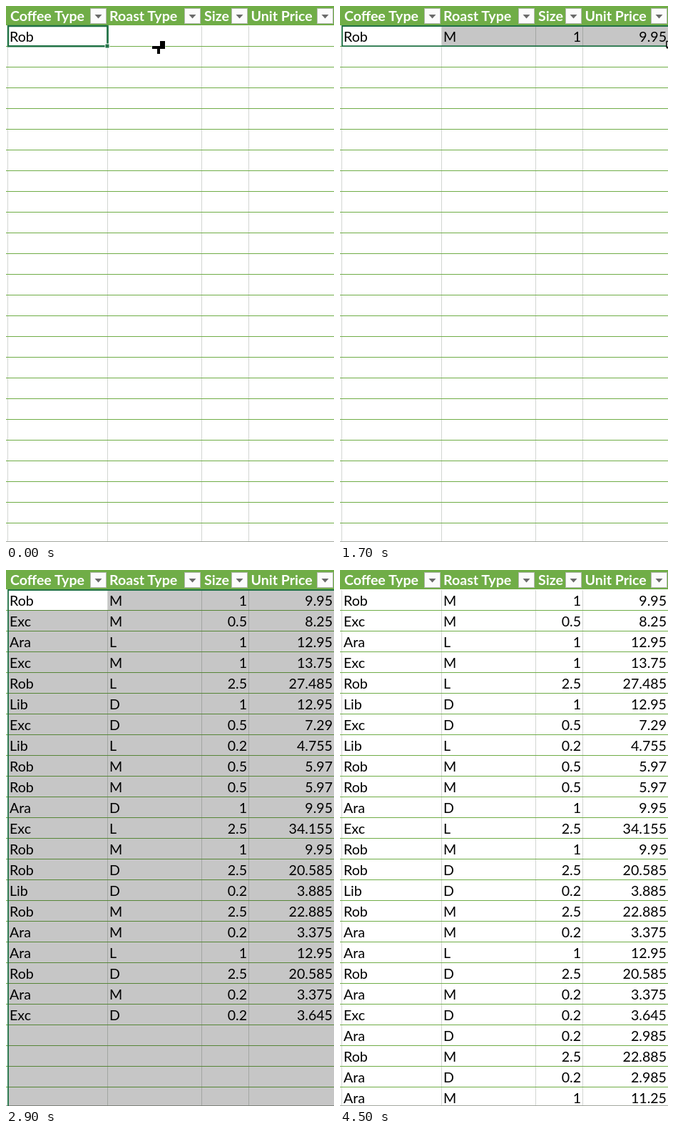
These frames come from a looping animation (460x750 px, 4600 ms). An HTML page:

```html
<!DOCTYPE html>
<html lang="en">
<head>
<meta charset="utf-8">
<title>Coffee table fill</title>
<style>
  html, body { margin: 0; width: 100%; height: 100%; overflow: hidden; background: #fff; }
  svg { display: block; width: 460px; height: 750px; }
  text { font: 19.6px Lato, Inter, sans-serif; fill: #000; white-space: pre; }
  .head { font-weight: 700; fill: #fff; }
  .end { text-anchor: end; }
</style>
</head>
<body>
<svg id="stage" viewBox="0 0 460 750"></svg>
<script>
const LOOP = 4600, STEP = 100;
const ROW = 29, TOP = 28, ROWS = 25;
const GREEN = '#70ad47', DARK = '#217346';
const COLS = [2, 142, 274, 340];
const stage = document.getElementById('stage');

function add(tag, attrs, parent = stage) {
  const el = document.createElementNS('http://www.w3.org/2000/svg', tag);
  for (const key in attrs) el.setAttribute(key, attrs[key]);
  return parent.appendChild(el);
}
const rect = (x, y, width, height, fill, parent) =>
  add('rect', { x, y, width, height, fill }, parent);
function label(x, y, str, cls, parent) {
  add('text', { x, y, class: cls }, parent).textContent = str;
}
const show = (el, on) => el.setAttribute('visibility', on ? 'visible' : 'hidden');

// Sheet grid
rect(0, 0, 460, 750, '#fff');
for (const x of COLS) rect(x, TOP, 1, 722, '#d2d6d2');
for (let i = 1; i < ROWS; i++) rect(0, TOP + i * ROW - 1, 460, 1, GREEN);
rect(0, 749, 460, 1, '#a4a8a0');

// Cell values: type, roast, size, price
const data = `Rob M 1 9.95|Exc M 0.5 8.25|Ara L 1 12.95|Exc M 1 13.75|Rob L 2.5 27.485
Lib D 1 12.95|Exc D 0.5 7.29|Lib L 0.2 4.755|Rob M 0.5 5.97|Rob M 0.5 5.97
Ara D 1 9.95|Exc L 2.5 34.155|Rob M 1 9.95|Rob D 2.5 20.585|Lib D 0.2 3.885
Rob M 2.5 22.885|Ara M 0.2 3.375|Ara L 1 12.95|Rob D 2.5 20.585|Ara M 0.2 3.375
Exc D 0.2 3.645|Ara D 0.2 2.985|Rob M 2.5 22.885|Ara D 0.2 2.985|Ara M 1 11.25`
  .split(/[|\n]/).map(line => line.trim().split(' '));

const rows = data.map(([type, roast, size, price], i) => {
  const group = add('g', {}), y = 50 + i * ROW;
  if (i) label(5, y, type, '', group);
  else label(5, y, type, '');
  label(145, y, roast, '', group);
  label(338, y, size, 'end', group);
  label(458, y, price, 'end', group);
  return group;
});

// Selection shade leaves the active cell clear
const shade = add('path', { fill: '#000', 'fill-opacity': 0.225 });

// Header with filter buttons
rect(0, 0, 460, TOP - 1, GREEN);
[['Coffee Type', 6, 118], ['Roast Type', 145, 250], ['Size', 278, 316], ['Unit Price', 343.5, 436]]
  .forEach(([name, x, bx]) => {
    label(x, 21, name, 'head');
    add('rect', { x: bx + .5, y: 3.5, width: 22, height: 21, fill: '#fbfbfb', stroke: '#b4b8b0' });
    add('path', { d: `M${bx + 6.5} 12h10l-5 5.5z`, fill: '#6a6a6a' });
  });

// Borders
const outline = add('path', { fill: 'none', stroke: DARK });
const active = add('g', {});
rect(141.5, 28, 2, 24, DARK, active);
rect(138.5, 52.5, 7, 7, '#fff', active);
rect(139.5, 53.5, 5, 5, DARK, active);

// Pointers
const cross = (arm, half) =>
  `M${-half} ${-arm}V${-arm}H${-half}V${-half}H${half}V${-arm}H${arm}V${half}H${half}V${arm}H${-half}V${half}H${-arm}V${-half}H${-half}z`;
const thin = add('path', { d: cross(9, 2), fill: '#000', stroke: '#fff', 'stroke-width': 1, 'paint-order': 'stroke' });
const wide = add('g', {});
add('path', { d: cross(9, 4), fill: '#000', stroke: '#000', 'stroke-width': 2, transform: 'translate(1 1)' }, wide);
add('path', { d: cross(9, 4), fill: '#fff', stroke: '#000', 'stroke-width': 1.5 }, wide);

// Pointer path: time, x, y
const path = [
  [0, 214, 58], [700, 437, 57], [1200, 437, 57], [1500, 467, 53.5], [1800, 467, 53.5],
  [2400, 466, 51.5], [2500, 466, 51.5], [2800, 490, 52], [3600, 490, 380],
  [3700, 314, 423], [3900, 320, 426], [4300, 480, 450], [LOOP, 480, 450]
];
function pointer(t) {
  const i = Math.max(1, path.findIndex(p => p[0] > t));
  const [t0, x0, y0] = path[i - 1], [t1, x1, y1] = path[i];
  const k = (t - t0) / (t1 - t0);
  return [x0 + (x1 - x0) * k, y0 + (y1 - y0) * k];
}

const RELEASE = 1200, FILL = 2500, CLEAR = 4500;

function draw(t) {
  const [x, y] = pointer(t);
  const dragging = t < RELEASE, full = t >= FILL, cleared = t >= CLEAR;

  const count = full ? Math.min(ROWS, 5 + 4 * Math.round((t - FILL) / STEP)) : dragging ? 0 : 1;
  rows.forEach((row, i) => show(row, i < count));

  show(shade, !dragging && !cleared);
  shade.setAttribute('d', 'M143 28H460V56H143z' + (full ? 'M3 56H460V750H3z' : ''));

  const right = !dragging || x > 395 ? 470 : x > 300 ? 341 : x > 225 ? 275 : 142.5;
  show(outline, !cleared);
  outline.setAttribute('stroke-width', dragging ? 2.5 : 1.8);
  outline.setAttribute('d', `M3 28H${right}V${full ? 760 : 56.2}H3z`);
  show(active, dragging);

  show(thin, dragging);
  show(wide, !dragging);
  (dragging ? thin : wide).setAttribute('transform', `translate(${x} ${y})`);
}

const start = performance.now();
function tick() {
  const t = (performance.now() - start) % LOOP;
  draw(Math.floor(t / STEP) * STEP);
  requestAnimationFrame(tick);
}
tick();
</script>
</body>
</html>
```
